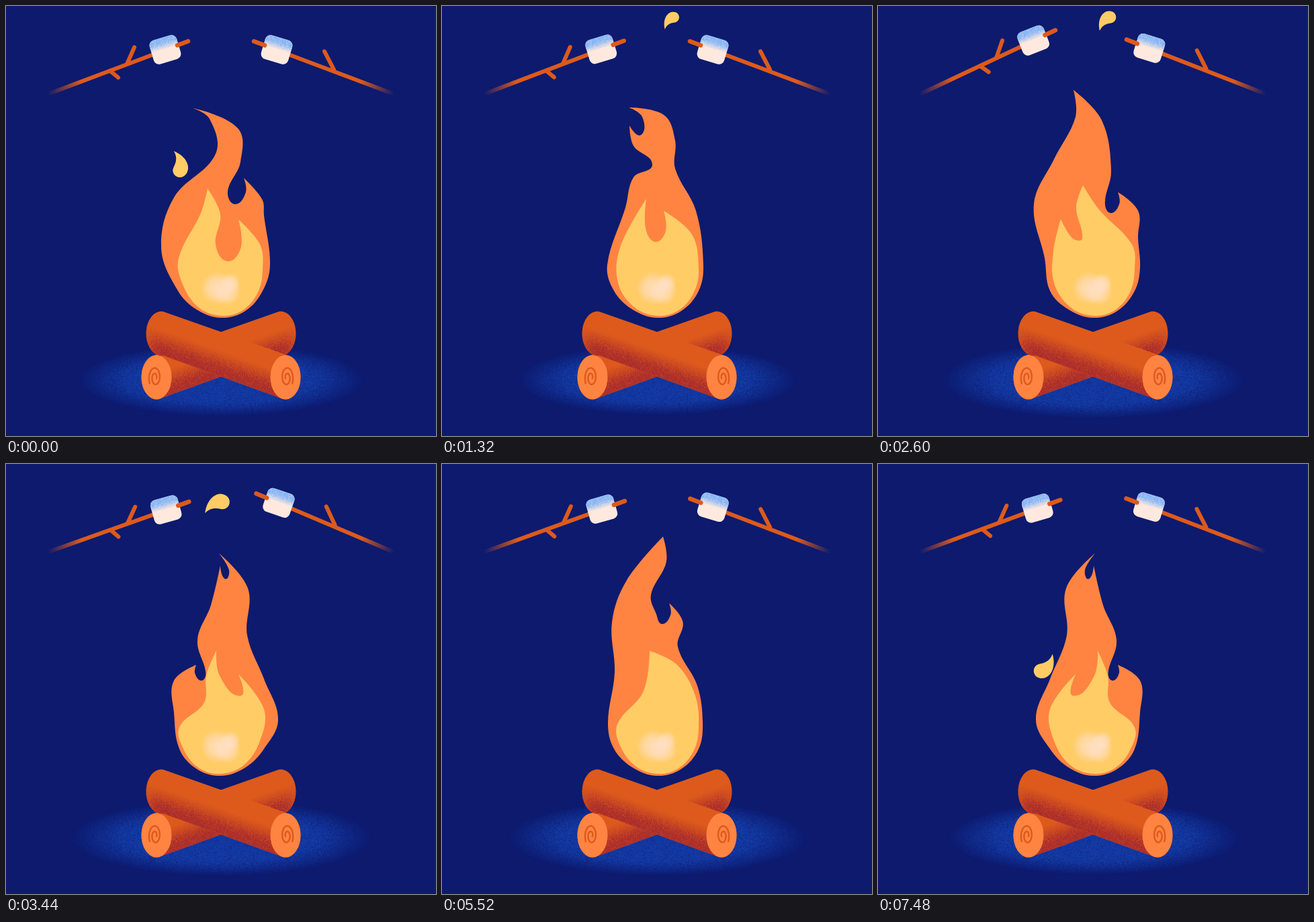
These frames come from a looping animation (640 by 640 pixels, 7520 ms). An HTML page with a canvas:

```html
<!DOCTYPE html>
<html lang="en">
<head>
<meta charset="utf-8">
<title>Campfire</title>
<style>
  html, body { margin: 0; width: 100%; height: 100%; overflow: hidden; background: #0d1a6e; }
  canvas { display: block; width: 100vw; height: 100vh; }
</style>
</head>
<body>
<canvas id="stage" width="640" height="640"></canvas>
<script>
const ctx = document.getElementById('stage').getContext('2d');
const NIGHT = '#0d1a6e', GLOW = '#143ca6', ORANGE = '#ff8442', YELLOW = '#ffcc66',
      WOOD = '#dd5a1c', BARK = '#a92c2c', CREAM = '#ffe9df', BLUE = '#82b4f6';
const FLICKER = 940, SWAY = 3760, TURN = 2 * Math.PI;
const clamp = v => Math.max(0, Math.min(1, v));
const mix = (a, b, k) => a + (b - a) * k;

// Closed smooth curve; points made by tip() stay sharp.
const tip = (x, y) => [x, y, true];
function smooth(points) {
  const path = new Path2D(), n = points.length;
  const handle = (at, before, after, other, sign) => {
    if (at[2]) return at;
    const dx = after[0] - before[0], dy = after[1] - before[1];
    const reach = sign * Math.hypot(other[0] - at[0], other[1] - at[1]) / (2.8 * Math.hypot(dx, dy));
    return [at[0] + dx * reach, at[1] + dy * reach];
  };
  path.moveTo(points[0][0], points[0][1]);
  points.forEach((b, i) => {
    const a = points[(i + n - 1) % n], c = points[(i + 1) % n], d = points[(i + 2) % n];
    const h1 = handle(b, a, c, c, 1), h2 = handle(c, b, d, b, -1);
    path.bezierCurveTo(h1[0], h1[1], h2[0], h2[1], c[0], c[1]);
  });
  path.closePath();
  return path;
}

// A side lick: round pocket, sharp tip, then a shoulder that widens lower down.
const lick = (x, y, s) => [
  [x - 24 * s, y + 20 * s], [x - 13 * s, y + 39 * s], [x + 3 * s, y + 21 * s], tip(x, y),
  [x + 16 + (y - 175) * .14, y + 12 + 20 * s]
];

const outerBase = [[382, 424], [356, 454], [320, 464], [284, 452], [256, 424]];
const outer = {
  a: [[231, 360], [250, 285], [312, 220], [303, 168], tip(278, 152), [345, 182], [349, 232],
      ...lick(354, 256, 1), [384, 312], [393, 385]],
  b: [[246, 385], [273, 300], [285, 255], [313, 236], [285, 208], tip(279, 178), [296, 192], [298, 165],
      tip(278, 151), [330, 162], [347, 200], [347, 242], [378, 305], [389, 385]],
  c: [[248, 375], [232, 295], [262, 228], [294, 165], tip(291, 125), [333, 170], [347, 245],
      ...lick(357, 277, .8), [387, 345], [390, 390]],
  d: [[246, 370], [230, 300], [245, 259], [294, 218], [289, 175], tip(343, 126), [316, 172],
      ...lick(327, 185, .6), [335, 262], [382, 340], [387, 395]],
  e: [[247, 385], [257, 310], [253, 235], [275, 173], tip(329, 108), [334, 145], [311, 195],
      ...lick(338, 207, .8), [351, 272], [380, 330], [388, 385]],
  f: [[235, 380], [256, 320], [281, 255], [280, 185], tip(323, 133), [308, 158], [314, 171],
      tip(321, 151), [335, 210], [355, 262], ...lick(357, 299, .6), [390, 370]]
};
const innerBase = [[382, 392], [375, 426], [352, 453], [320, 461], [286, 448], [262, 412]];
const inner = {
  a: [[257, 375], [290, 308], tip(300, 272), [319, 310], [312, 355], [330, 380], [350, 358],
      tip(346, 318), [378, 355]],
  b: [[265, 360], tip(304, 287), [303, 330], [317, 351], [333, 335], tip(330, 305), [372, 340]],
  c: [[261, 365], tip(272, 317), [290, 346], [304, 346], [295, 300], tip(305, 267), [330, 304], [378, 355]],
  d: [[266, 365], tip(286, 322), [291, 350], [318, 325], tip(310, 276), [350, 305], [376, 345]],
  e: [[262, 385], [300, 338], tip(309, 278), [350, 299], [377, 345]],
  f: [[256, 365], tip(294, 313), [291, 345], [322, 315], tip(327, 278), [342, 315], [345, 355]]
};
for (const key in outer) {
  outer[key] = smooth([...outer[key], ...outerBase]);
  inner[key] = smooth([...inner[key], ...innerBase]);
}

// Drawings of one flicker, evenly held; capitals are mirrored.
const CELS = 'aedCbadFEcef';

let seed = 7;
function random() {
  seed = (seed * 1664525 + 1013904223) >>> 0;
  return seed / 4294967296;
}
// Speckled layer; density is a function of the offset from its centre.
function grain(w, h, color, density) {
  const layer = document.createElement('canvas');
  layer.width = w;
  layer.height = h;
  const g = layer.getContext('2d');
  g.fillStyle = color;
  for (let y = 0; y < h; y++)
    for (let x = 0; x < w; x++) {
      g.globalAlpha = clamp(density(x - w / 2, y - h / 2) * (.5 + random()));
      g.fillRect(x, y, 1, 1);
    }
  return layer;
}
const glowGrain = grain(440, 120, GLOW, (x, y) => clamp((1.03 - Math.hypot(x / 212, y / 54)) / .42));
const barkGrain = grain(260, 68, BARK, (x, y) => clamp((y + 7) / 30) ** 1.2 * clamp((x + 122) / 30));
const sugarGrain = grain(44, 40, BLUE, (x, y) => clamp((-1 - y) / 11));

function placed(x, y, angle, draw) {
  ctx.save();
  ctx.translate(x, y);
  ctx.rotate(angle);
  draw();
  ctx.restore();
}
function flipped(draw) {
  ctx.save();
  ctx.translate(640, 0);
  ctx.scale(-1, 1);
  draw();
  ctx.restore();
}

function drawGlow(t) {
  const size = .985 - .055 * Math.cos((t - 230) / FLICKER * TURN);
  placed(320, 556, 0, () => {
    ctx.scale(size, size);
    ctx.drawImage(glowGrain, -220, -60);
  });
}

function drawLog() {
  ctx.save();
  ctx.beginPath();
  ctx.ellipse(231, 487.5, 22.5, 33, 0, Math.PI * .46, Math.PI * 1.54);
  ctx.ellipse(416, 552.5, 22.5, 33, 0, -Math.PI * .46, Math.PI * .54);
  ctx.closePath();
  ctx.fillStyle = WOOD;
  ctx.fill();
  ctx.clip();
  ctx.transform(1, 65 / 185, 0, 1, 320, 519);
  ctx.drawImage(barkGrain, -130, -34);
  ctx.restore();

  ctx.beginPath();
  ctx.ellipse(416, 552.5, 22.5, 33, 0, 0, TURN);
  ctx.fillStyle = ORANGE;
  ctx.fill();
  ctx.beginPath();
  for (let a = 0; a <= 10.4; a += .1) {
    const r = 1 - a / 13;
    ctx.lineTo(418 - Math.cos(a + 2.6) * 9.5 * r, 553 + Math.sin(a + 2.6) * 17 * r);
  }
  ctx.strokeStyle = WOOD;
  ctx.lineWidth = 2.4;
  ctx.lineCap = 'round';
  ctx.stroke();
}

function drawFlame(t) {
  const cel = CELS[Math.floor(t / FLICKER * CELS.length)], key = cel.toLowerCase();
  const paint = () => {
    ctx.fillStyle = ORANGE;
    ctx.fill(outer[key]);
    ctx.fillStyle = YELLOW;
    ctx.fill(inner[key]);
  };
  if (cel === key) paint();
  else flipped(paint);
}

function drawCore() {
  for (const [x, y, r] of [[314, 420, 25], [329, 425, 21], [334, 412, 15]]) {
    const g = ctx.createRadialGradient(x, y, 0, x, y, r);
    g.addColorStop(0, 'rgba(255,224,200,.8)');
    g.addColorStop(.5, 'rgba(255,224,200,.6)');
    g.addColorStop(1, 'rgba(255,224,200,0)');
    ctx.fillStyle = g;
    ctx.fillRect(x - r, y - r, 2 * r, 2 * r);
  }
}

// Sparks shoot up from the left, curl over the fire and shrink away.
const SPARKS = [
  { birth: 900, life: 420, x: 244, size: 12 },
  { birth: 385, life: 140, x: 240, size: 15 },
  { birth: 500, life: 220, x: 205, size: 14 }
];
const comma = new Path2D('M1.4-1.9C1.8-.2 1 1.05 0 1.05C-1.3 1.05-1.35-.6-.25-.75C.6-.85 1.1-1.2 1.4-1.9Z');
function drawSpark({ birth, life, x, size }, t) {
  const k = (t - birth + FLICKER) % FLICKER / life;
  if (k > 1.1) return;
  const rise = 1 - (1 - Math.min(k, 1)) ** 2.5;
  const scale = size * (1 - .25 * k) * clamp((1.1 - k) * 10);
  placed(mix(x, 344, rise ** 1.3), mix(308, 18, rise), -Math.PI * rise ** .8, () => {
    ctx.scale(scale, scale);
    ctx.fillStyle = YELLOW;
    ctx.fill(comma);
  });
}

function line(x1, y1, x2, y2) {
  ctx.beginPath();
  ctx.moveTo(x1, y1);
  ctx.lineTo(x2, y2);
  ctx.stroke();
}
// Drawn from its far end, which is the pivot; dip is how far the tip sinks.
function drawStick(dip, twigs) {
  placed(64, 130.5, dip / 206, () => {
    const fade = ctx.createLinearGradient(-2, 1, 48, -18);
    fade.addColorStop(0, 'rgba(221,90,28,0)');
    fade.addColorStop(1, WOOD);
    ctx.strokeStyle = fade;
    ctx.lineCap = 'round';
    ctx.lineWidth = 6;
    line(0, 0, 173, -65);
    twigs.forEach(t => line(...t));
    placed(173, -65.5, -.29, () => {
      ctx.beginPath();
      ctx.roundRect(-21, -18.5, 42, 37, 8);
      ctx.fillStyle = CREAM;
      ctx.fill();
      ctx.clip();
      ctx.drawImage(sugarGrain, -22, -20);
    });
    ctx.strokeStyle = WOOD;
    ctx.lineWidth = 6.5;
    line(191, -72, 207, -78);
  });
}

function draw(time) {
  const t = time % FLICKER, u = time / SWAY * TURN;
  const leftDip = -6.5 + 6.5 * Math.cos(2 * u) - 8 * Math.sin(2 * u);
  const rightDip = 5.8 * Math.sin(2 * u) + 6.9 * Math.sin(u);
  ctx.fillStyle = NIGHT;
  ctx.fillRect(0, 0, 640, 640);
  drawGlow(t);
  flipped(drawLog);
  drawLog();
  SPARKS.forEach(spark => drawSpark(spark, t));
  drawFlame(t);
  drawCore();
  drawStick(leftDip, [[116, -44, 127, -69], [91, -34, 103, -24]]);
  flipped(() => drawStick(rightDip, [[88, -36, 102, -63]]));
}

const start = performance.now();
function tick() {
  draw(Math.max(0, performance.now() - start));
  requestAnimationFrame(tick);
}
tick();
</script>
</body>
</html>
```
